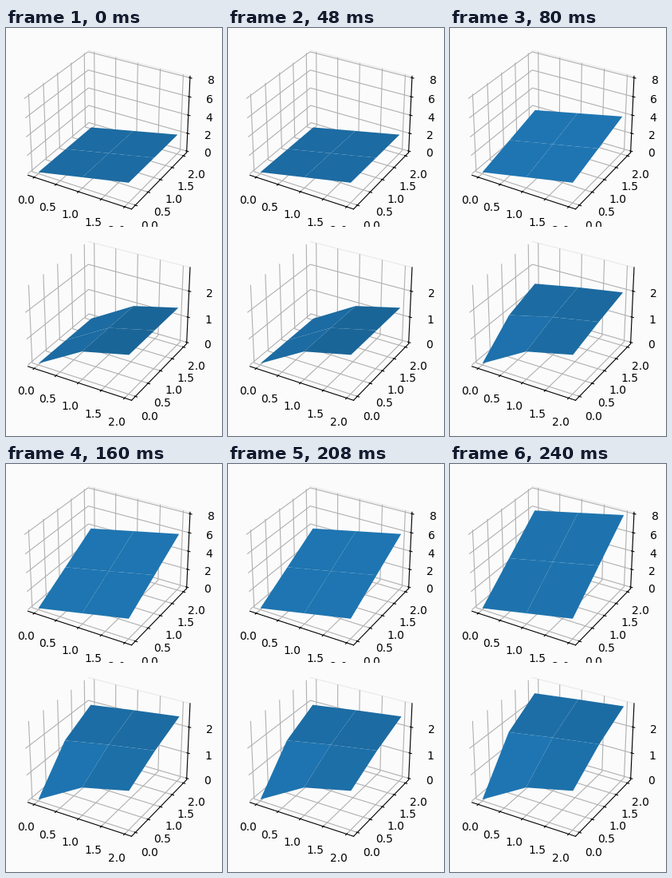
A matplotlib script that plays this animation: 271 by 511 pixels, repeating every 320 ms.

```python
import numpy as np
import matplotlib.pyplot as plt
from matplotlib.animation import FuncAnimation

W, H, DPI = 271, 511, 100
SIDE = 231.4              # axes box, px
LEFT, TOP, STEP = 10.1, 10, 239.5
BG = "#fbfbfb"
BLUE = "#1f77b4"
PAD = 1 / 48

plt.rcParams.update({"font.family": "DejaVu Sans", "font.size": 10,
                     "figure.facecolor": BG, "axes.facecolor": BG})

fig = plt.figure(figsize=(W / DPI, H / DPI), dpi=DPI)
X, Y = np.meshgrid(np.arange(3.0), np.arange(3.0))
half_ticks = np.arange(0, 2.1, 0.5)


def make_axes(row, z_top, z_ticks):
    bottom = H - TOP - row * STEP - SIDE
    ax = fig.add_axes([LEFT / W, bottom / H, SIDE / W, SIDE / H],
                      projection="3d")
    for axis in (ax.xaxis, ax.yaxis, ax.zaxis):
        axis.set_pane_color(BG)
    ax.yaxis.pane.set_edgecolor("#ececec")
    ax.set_xticks(half_ticks)
    ax.set_yticks(half_ticks)
    ax.set_zticks(z_ticks)
    return ax


def set_limits(ax, z_top):
    ax.set_xlim(-0.1, 2.1, view_margin=PAD)
    ax.set_ylim(-0.1, 2.1, view_margin=PAD)
    ax.set_zlim(0, z_top, view_margin=PAD)


plane_ax = make_axes(0, 8, [0, 2, 4, 6, 8])
root_ax = make_axes(1, np.sqrt(8), [0, 1, 2])
set_limits(plane_ax, 8)
set_limits(root_ax, np.sqrt(8))
surfaces = []


def clear():
    while surfaces:
        surfaces.pop().remove()
    return []


def draw(t):
    clear()
    Z = X + t * Y
    for ax, height in ((plane_ax, Z), (root_ax, np.sqrt(Z))):
        surfaces.append(ax.plot_surface(X, Y, height, color=BLUE))
    return surfaces


anim = FuncAnimation(fig, draw, frames=4, init_func=clear, interval=80,
                     repeat=True, repeat_delay=0, blit=False)
plt.show()
```
